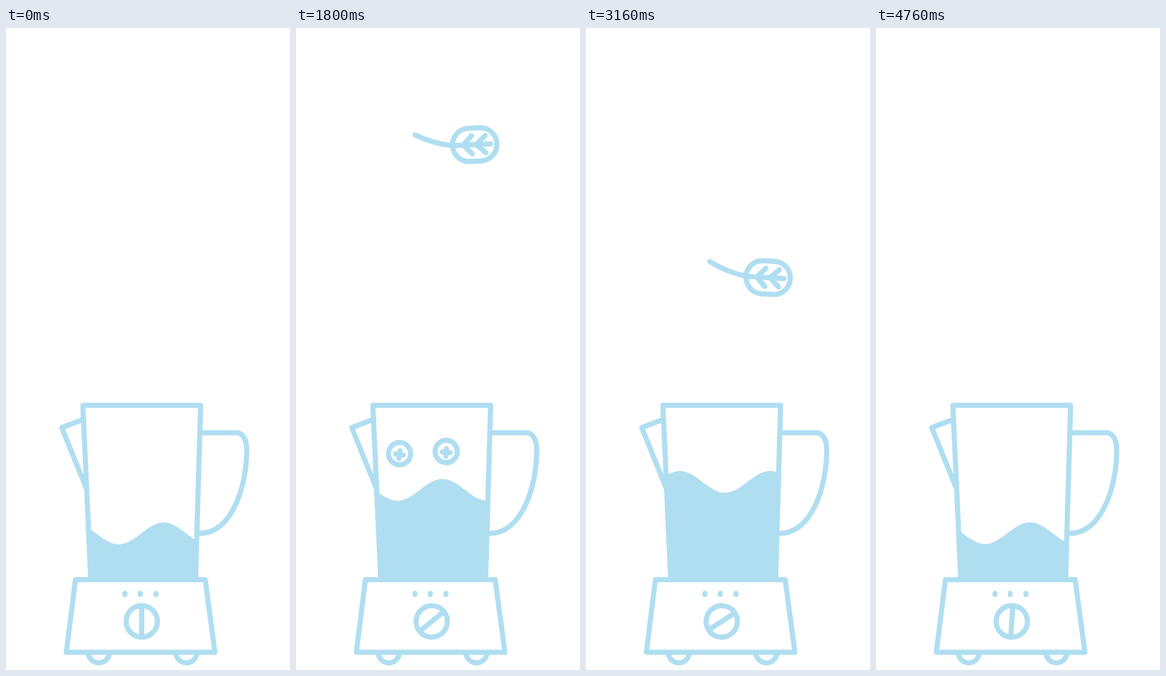
An HTML page with a canvas for the animation above (4.8 s loop, 499x1123 px).

```html
<!DOCTYPE html>
<html lang="en">
<head>
<meta charset="utf-8">
<title>Blender</title>
<style>
  html, body { margin: 0; width: 499px; height: 1123px; overflow: hidden; background: #fff; }
  canvas { display: block; }
</style>
</head>
<body>
<canvas id="stage" width="499" height="1123"></canvas>
<script>
const ctx = document.getElementById('stage').getContext('2d');
const BLUE = '#b0def1';
const LOOP = 4800;
const CYCLE = LOOP / 2;
const STEP = 40;
const WAVE = 158;
const SUNK = 900;
const TURN = 2 * Math.PI;
const RAD = Math.PI / 180;

// Shapes, each around its own centre
const lemon = new Path2D(`M-65 0H65A65 65 0 0 1-65 0ZM-51 0A52.5 52.5 0 0 0 54 0
  M1 1L-34 38M1 1L-2 52M1 1L41 37`);
const berry = new Path2D('M19.5 0A19.5 19.5 0 1 1-19.5 0A19.5 19.5 0 1 1 19.5 0M-7-1.5H7M0-8.5V5');
const pea = new Path2D('M7 0A7 7 0 1 1-7 0A7 7 0 1 1 7 0');
const leaf = new Path2D(`M-10-29H10A29 29 0 0 1 10 29H-10A29 29 0 0 1-10-29Z
  M-104-22Q-73-5-38 0L28 0M-5-16L-20 0L-5 16M19-15L3 0L19 15`);
const avocado = new Path2D(`M4-70C33-70 53-47 53-19C53 5 38 10 38 40C38 60 27 69 15 69
  C-5 69 0 48-13 34C-26 22-47 10-47-19C-47-47-25-70 4-70Z
  M-28-58C-48-46-58-31-58-13C-58 14-35 22-24 35C-11 50-8 69 15 69
  M31.5-18A27.5 27.5 0 1 1-23.5-18A27.5 27.5 0 1 1 31.5-18M20-23C21-10 14-2 5-1`);

const jug = new Path2D(`M149 964L135 660H342L333 964M135 685L98 699L141 805
  M342 708H405C417 708 423 722 423 738C423 802 397 884 340 884`);
const glass = new Path2D('M130.5 660H346.5L337.5 964H144.5Z');
const feet = new Path2D('M144.5 1092A18.5 18.5 0 0 0 181.5 1092M298.5 1092A18.5 18.5 0 0 0 335.5 1092');
const base = new Path2D('M122 965H350L367 1092H106Z');
const dots = new Path2D('M209 989V991M236 989V991M263.5 989V991');
const knob = new Path2D('M27.5 0A27.5 27.5 0 1 1-27.5 0A27.5 27.5 0 1 1 27.5 0M0-27V27');

// A tossed thing slows sideways from x0 to x1 and falls from its peak
// with the given pull; it stands upright at the time `upright`.
function toss(shape, { start, end, x0, x1, peak, top, pull = 852e-6, spin = 0, upright = 0 }) {
  return { shape, start, at(t) {
    const left = Math.max(0, (end - t) / (end - start)) ** 1.5;
    return [x1 + (x0 - x1) * left, top + pull * (t - peak) ** 2, spin * (t - upright)];
  } };
}

// The leaf glides in, swings with a fading sway, then sinks into the jug.
function sway(t) {
  const s = (t - 1800) / 720;
  const entry = Math.min(s, 0), sink = Math.max(s - 2.83, 0);
  const swing = Math.cos(TURN * Math.max(t - 1800, 0) / 1360);
  return [
    233.7 + 20.4 * s + (80.3 - 17.2 * s) * swing + 80 * entry ** 4 - 120 * sink,
    204 + 81 * s + 22.3 * s * s + 9.3 * (1 - swing) + 400 * sink * sink,
    23.7 - 2.7 * s - (26.4 - 5.9 * s) * swing
  ];
}

const items = [
  toss(lemon, { start: 80, end: 940, x0: -75, x1: 250, peak: 417, top: 307, spin: 0.25, upright: 712 }),
  toss(berry, { start: 575, end: 1840, x0: 526, x1: 180, peak: 1113, top: 28, pull: 1518e-6, spin: 0.174, upright: 720 }),
  toss(berry, { start: 780, end: 1840, x0: 526, x1: 262, peak: 1180, top: 90, pull: 1693e-6, spin: 0.174, upright: 745 }),
  toss(avocado, { start: 1810, end: 2840, x0: -72, x1: 202, peak: 2050, top: 277, spin: 0.05, upright: 2520 }),
  { shape: leaf, start: 760, at: sway },
  toss(pea, { start: 3253, end: 4300, x0: 510, x1: 192, peak: 3287, top: 239 }),
  toss(pea, { start: 3365, end: 4300, x0: -13, x1: 294, peak: 3513, top: 137 })
];

// Top of the wave: one rise and fall per cycle, slightly skewed
function crestAt(t) {
  const a = TURN * t / CYCLE;
  const lift = (1 - Math.cos(a)) / 2;
  return 865 - lift * (148 + 20 * Math.sin(2 * a) + 6 * Math.sin(a / 2));
}

const spring = u => u < 0 ? 0 : 1 - Math.exp(-u / 240) * Math.cos(TURN * u / 1200);

// Switched on and off once per cycle, each time with a springy overshoot
function knobTurn(t) {
  const p = t % CYCLE, on = 290, off = 2100;
  return 51 * (1 - spring(p + CYCLE - off) + spring(p - on) - spring(p - off));
}

// A short jolt, right then left, when something lands
const landings = [1080, 1840, 2880, 4080, 4440];
function jolt(t) {
  const since = landings.map(l => t - l).find(d => d >= 0 && d < 2 * STEP);
  return since === undefined ? 0 : since < STEP ? 3 : -4;
}

function place(shape, x, y, turn) {
  ctx.save();
  ctx.translate(x, y);
  ctx.rotate(turn * RAD);
  ctx.stroke(shape);
  ctx.restore();
}

function drawLiquid(t) {
  const crest = crestAt(t);
  const shift = 277 + WAVE * t / 960;
  ctx.save();
  ctx.clip(glass);
  ctx.beginPath();
  ctx.moveTo(126, 970);
  for (let x = 126; x <= 350; x += 2) {
    ctx.lineTo(x, crest + 19 * (1 - Math.cos(TURN * (x - shift) / WAVE)));
  }
  ctx.lineTo(350, 970);
  ctx.fill();
  ctx.restore();
}

function draw(t) {
  ctx.fillStyle = '#fff';
  ctx.fillRect(0, 0, 499, 1123);
  ctx.strokeStyle = BLUE;
  ctx.lineWidth = 9;
  ctx.lineCap = ctx.lineJoin = 'round';

  for (const { shape, start, at } of items) {
    const [x, y, turn] = at(t);
    if (t >= start && y < SUNK) place(shape, x, y, turn);
  }

  ctx.save();
  ctx.translate(jolt(t), 0);
  ctx.fillStyle = BLUE;
  drawLiquid(t);
  ctx.stroke(jug);
  ctx.stroke(feet);
  ctx.fillStyle = '#fff';
  ctx.fill(base);
  ctx.stroke(base);
  ctx.stroke(dots);
  place(knob, 238.5, 1038, knobTurn(t));
  ctx.restore();
}

const begin = performance.now();
function tick() {
  const t = (performance.now() - begin) % LOOP;
  draw(Math.floor(t / STEP) * STEP);
  requestAnimationFrame(tick);
}
tick();
</script>
</body>
</html>
```
